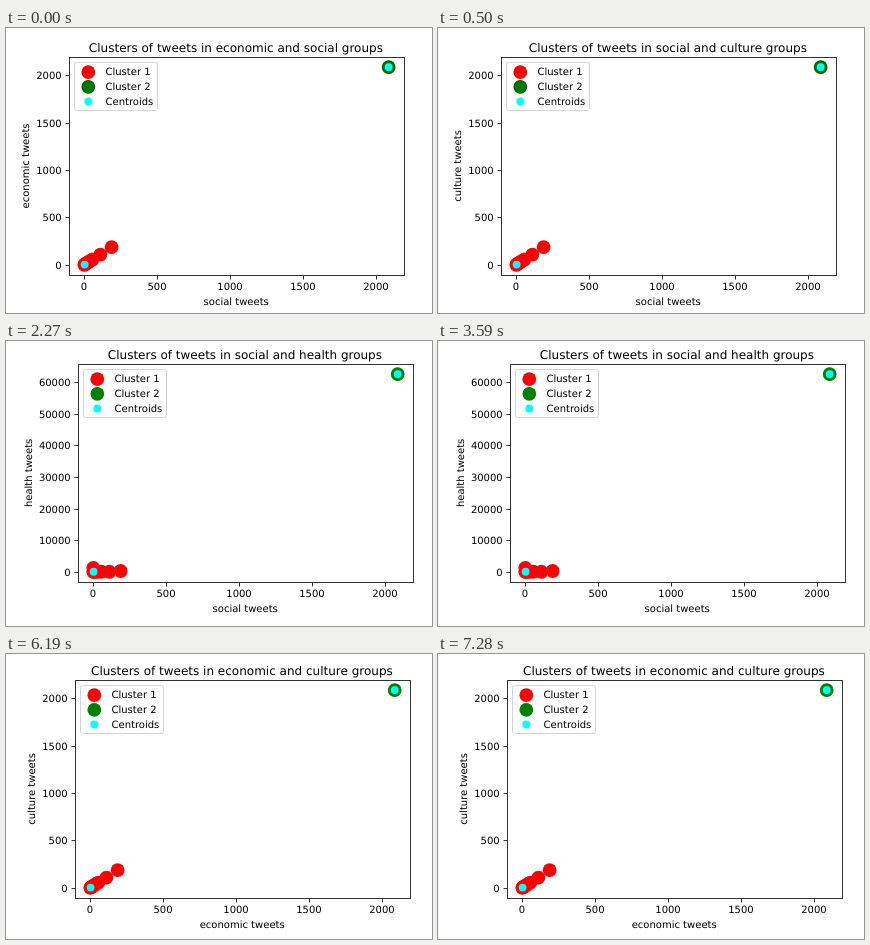
An HTML page for the animation above (8 s loop, 426 px wide and 285 px high).

```html
<!DOCTYPE html>
<html lang="en">
<head>
<meta charset="utf-8">
<title>Cluster plots</title>
<style>
  html, body { margin: 0; width: 100%; height: 100%; overflow: hidden; background: #fff; }
  svg { display: block; width: 100vw; height: 100vh; }
  text { font: 10px "DejaVu Sans", sans-serif; fill: #000; text-rendering: geometricPrecision; }
  .title { font-size: 12px; }
  .mid { text-anchor: middle; }
  .end { text-anchor: end; }
  .line { stroke: #333; stroke-width: 1; fill: none; }
</style>
</head>
<body>
<svg id="stage" viewBox="0 0 426 285"></svg>
<script>
const NS = 'http://www.w3.org/2000/svg';
const stage = document.getElementById('stage');
const LOOP = 8000;
// Plot size before its frame is snapped to whole pixels, and the 5% margins inside it.
const W = 334.8, H = 217.44, PAD_X = W / 22, PAD_Y = H / 22;
const MAX = { social: 2085, economic: 2085, culture: 2085, health: 62500 };

// Values of the small cluster: shared by three topics, and separately for health.
const counts = [0, 3, 8, 14, 22, 30, 40, 55, 110, 187];
const plain = counts.map(v => [v, v === 110 ? 106 : v]);
const health = [[0, 1250], [3, 300], [0, 0], [3, -60], [14, 0], [30, 0], [55, 0], [110, 0], [187, 240]];

const bright = { fill: '#008000', stroke: '#008000' };
const deep = { fill: '#007a00', stroke: '#005a00' };
const dark = { fill: '#007a00', stroke: '#002800' };

// Start time, topics in the title, x and y topic, plot corner, shade of the green dots.
const scenes = [
  { at: 0, names: ['economic', 'social'], x: 'social', y: 'economic', left: 63.1, top: 29.2, green: deep },
  { at: 500, names: ['social', 'culture'], x: 'social', y: 'culture', left: 63.1, top: 29.2, green: deep },
  { at: 2270, names: ['social', 'health'], x: 'social', y: 'health', left: 72.1, top: 23.2, green: bright },
  { at: 4470, names: ['economic', 'health'], x: 'economic', y: 'health', left: 72.1, top: 24.2, green: dark },
  { at: 6190, names: ['economic', 'culture'], x: 'economic', y: 'culture', left: 69.1, top: 26.2, green: bright }
];

function add(parent, tag, attrs, content) {
  const node = document.createElementNS(NS, tag);
  for (const key in attrs) node.setAttribute(key, attrs[key]);
  if (content !== undefined) node.textContent = content;
  parent.appendChild(node);
  return node;
}

const snap = v => Math.round(v) + 0.5;

function redDot(g, cx, cy) {
  add(g, 'circle', { cx, cy, r: 6.9, fill: '#f00' });
}

function greenDot(g, cx, cy, shade) {
  add(g, 'circle', { cx, cy, r: 6.3, 'stroke-width': 1.2, ...shade });
}

function cyanDot(g, cx, cy) {
  add(g, 'circle', { cx, cy, r: 3.9, fill: '#0ff' });
}

function drawLegend(g, s) {
  const left = snap(s.left), top = snap(s.top);
  const x = left + 18.8;
  const rows = [14.6, 29.3, 44].map(d => top + d);
  add(g, 'rect', { x: left + 5, y: top + 5, width: 83, height: 48, rx: 2, fill: '#fff', stroke: '#d4d4d4' });
  redDot(g, x, rows[0]);
  greenDot(g, x, rows[1], s.green);
  cyanDot(g, x, rows[2]);
  ['Cluster 1', 'Cluster 2', 'Centroids'].forEach((label, i) =>
    add(g, 'text', { x: left + 36, y: Math.round(rows[i] + 3.2) }, label));
}

function drawScene(s) {
  const g = add(stage, 'g', { visibility: 'hidden' });
  const left = snap(s.left), top = snap(s.top);
  const bottom = snap(s.top + H), right = snap(s.left + W);
  const midX = s.left + W / 2 - 0.3, midY = s.top + H / 2;
  const isHealth = s.y === 'health';
  const px = v => s.left + PAD_X + v / MAX[s.x] * (W - 2 * PAD_X);
  const py = v => s.top + H - PAD_Y - v / MAX[s.y] * (H - 2 * PAD_Y);

  (isHealth ? health : plain).forEach(([a, b]) => redDot(g, px(a), py(b)));
  greenDot(g, px(MAX[s.x]), py(MAX[s.y]), s.green);
  cyanDot(g, px(2), py(2));
  cyanDot(g, px(MAX[s.x]), py(MAX[s.y]));

  for (let v = 0; v <= 2000; v += 500) {
    add(g, 'path', { d: `M${snap(px(v))} ${bottom}v4`, class: 'line' });
    add(g, 'text', { x: px(v) - 0.3, y: bottom + 14.5, class: 'mid' }, v);
  }
  const step = isHealth ? 10000 : 500;
  for (let v = 0; v < MAX[s.y]; v += step) {
    const y = snap(py(v));
    add(g, 'path', { d: `M${left} ${y}h-4`, class: 'line' });
    add(g, 'text', { x: s.left - 7.4, y: y + 3.5, class: 'end' }, v);
  }
  add(g, 'rect', { x: left, y: top, width: right - left, height: bottom - top, class: 'line' });

  add(g, 'text', { x: midX - 0.3, y: top - 5.5, class: 'title mid' },
    `Clusters of tweets in ${s.names.join(' and ')} groups`);
  add(g, 'text', { x: midX, y: bottom + 29.5, class: 'mid' }, s.x + ' tweets');
  const labelX = left - (isHealth ? 46.5 : 40.5);
  add(g, 'text', { transform: `translate(${labelX} ${midY}) rotate(-90)`, class: 'mid' }, s.y + ' tweets');
  drawLegend(g, s);
  return g;
}

const groups = scenes.map(drawScene);
const start = performance.now();

function update() {
  const t = (performance.now() - start) % LOOP;
  const current = scenes.filter(s => s.at <= t).length - 1;
  groups.forEach((g, i) => g.setAttribute('visibility', i === current ? 'visible' : 'hidden'));
  requestAnimationFrame(update);
}
update();
</script>
</body>
</html>
```
